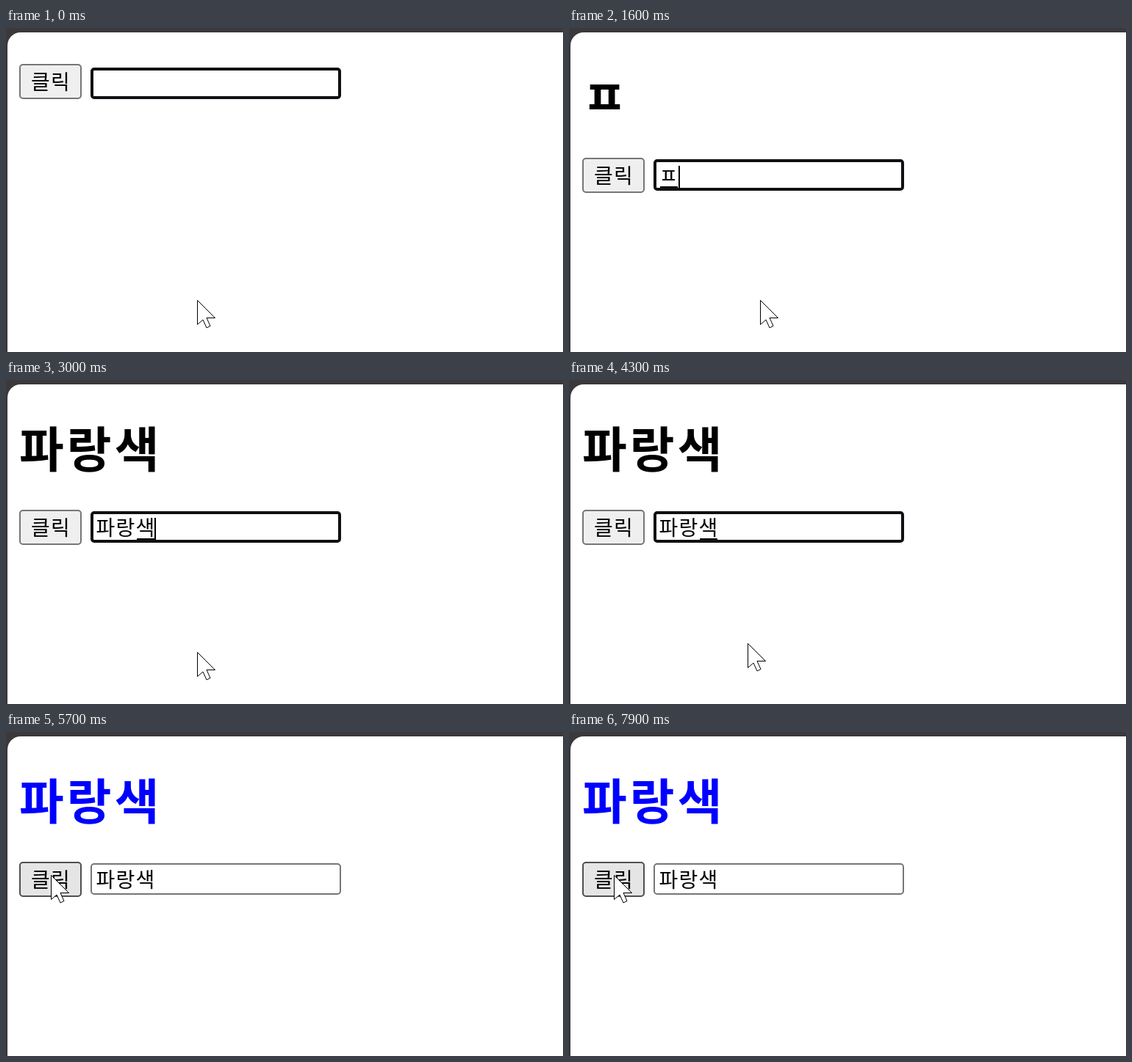
Recreate the animation shown at these times as an HTML page with a canvas. Size 758x442 px, loop 8000 ms.

```html
<!DOCTYPE html>
<html lang="ko">
<head>
<meta charset="utf-8">
<title>파랑색</title>
<style>
html, body { margin: 0; width: 758px; height: 442px; overflow: hidden; background: #fff; }
canvas { display: block; }
</style>
</head>
<body>
<canvas id="stage" width="758" height="442"></canvas>
<script>
const ctx = document.getElementById('stage').getContext('2d');
const LOOP = 8000, STEP = 100;
const FONT = '"Noto Sans CJK KR", "Noto Sans CJK", sans-serif';
const ADVANCE = 27;

// Start time and what the input holds from then on
const typing = [
  [0, ''], [1600, 'ㅍ'], [1700, '파'], [1900, '팔'], [2100, '파라'],
  [2400, '파랑'], [2500, '파랑새'], [3000, '파랑색']
];
const caretSpans = [[100, 300], [1000, 3300]];
const path = [[0, 260, 371], [4000, 260, 371], [4100, 257, 371],
  [4200, 257, 371], [4800, 67, 203], [5100, 61, 195]];
const BLUR = 5300, BLUE = 5500, SQUIGGLE = 4400;
const pressSpans = [[5300, 5500], [6500, 7000]];

const inside = (t, spans) => spans.some(([a, b]) => t >= a && t < b);
const textAt = t => typing.filter(k => k[0] <= t).pop()[1];

function pointerAt(t) {
  const i = path.findIndex(p => p[0] > t);
  if (i < 0) return path[path.length - 1].slice(1);
  const [t0, x0, y0] = path[i - 1], [t1, x1, y1] = path[i];
  const u = (t - t0) / (t1 - t0), e = u * u * (3 - 2 * u);
  return [Math.round(x0 + (x1 - x0) * e), Math.round(y0 + (y1 - y0) * e)];
}

function box(x, y, w, h, line, stroke, fill) {
  ctx.beginPath();
  ctx.roundRect(x + line / 2, y + line / 2, w - line, h - line, 5 - line / 2);
  ctx.fillStyle = fill;
  ctx.fill();
  ctx.lineWidth = line;
  ctx.strokeStyle = stroke;
  ctx.stroke();
}

function label(text, x, y, size, spacing, weight, color) {
  ctx.font = `${weight} ${size}px ${FONT}`;
  ctx.letterSpacing = spacing + 'px';
  ctx.fillStyle = color;
  ctx.fillText(text, x, y);
}

function drawPage() {
  ctx.fillStyle = '#3b393c';
  ctx.fillRect(0, 0, 758, 442);
  ctx.beginPath();
  ctx.roundRect(2, 6, 800, 500, 18);
  ctx.fillStyle = '#fff';
  ctx.fill();
}

function drawButton(top, hover, pressed) {
  const [fill, edge] = pressed ? ['#f5f5f5', '#8d8d8d']
    : hover ? ['#e5e5e5', '#4f4f4f'] : ['#efefef', '#767676'];
  box(18, top, 85, 48, 2, edge, fill);
  label('클릭', 34, top + 35, 28, 1.24, 400, '#000');
}

function drawInput(text, top, t) {
  const focused = t < BLUR;
  box(115, top, 341, 43, focused ? 4 : 2, focused ? '#101014' : '#767676', '#fff');
  label(text, 122.5, top + 33, 28, 1.24, 400, '#000');
  if (!focused) return;

  const end = 123 + text.length * ADVANCE;
  if (t >= SQUIGGLE) {
    ctx.beginPath();
    for (let x = 123; x <= 202; x++) {
      ctx.lineTo(x, top + 36 - 2.4 * Math.cos((x - 123) / 13 * 2 * Math.PI + 2.5));
    }
    ctx.strokeStyle = '#e0262b';
    ctx.lineWidth = 2;
    ctx.stroke();
  }
  ctx.fillStyle = '#000';
  if (text) ctx.fillRect(end - ADVANCE + 1, top + 37, ADVANCE - 3, 2);
  if (inside(t, caretSpans)) {
    const x = text ? end - (text.length > 2 ? 2 : 1) : 123;
    ctx.fillRect(x, top + (text ? 9 : 6), 2, 30);
  }
}

function drawPointer(x, y) {
  ctx.save();
  ctx.translate(x + .5, y + .5);
  ctx.beginPath();
  [[0, 0], [0, 33], [7.5, 26.5], [12.5, 37.5], [17.5, 35], [12.5, 24], [24, 24]]
    .forEach(p => ctx.lineTo(...p));
  ctx.closePath();
  ctx.fillStyle = '#fff';
  ctx.fill();
  ctx.lineWidth = 1;
  ctx.strokeStyle = '#000';
  ctx.stroke();
  ctx.restore();
}

function draw(t) {
  const text = textAt(t), [px, py] = pointerAt(t);
  const hover = px >= 18 && px < 103 && py >= 177 && py < 225;
  drawPage();
  if (text) label(text, 18, 119, 66, 4.1, 700, t >= BLUE ? '#00f' : '#000');
  drawButton(text ? 177 : 49, hover, inside(t, pressSpans));
  drawInput(text, text ? 179 : 54, t);
  drawPointer(px, py);
}

const start = performance.now();
function tick() {
  const t = (performance.now() - start) % LOOP;
  draw(Math.floor(t / STEP) * STEP);
  requestAnimationFrame(tick);
}
tick();
</script>
</body>
</html>
```
